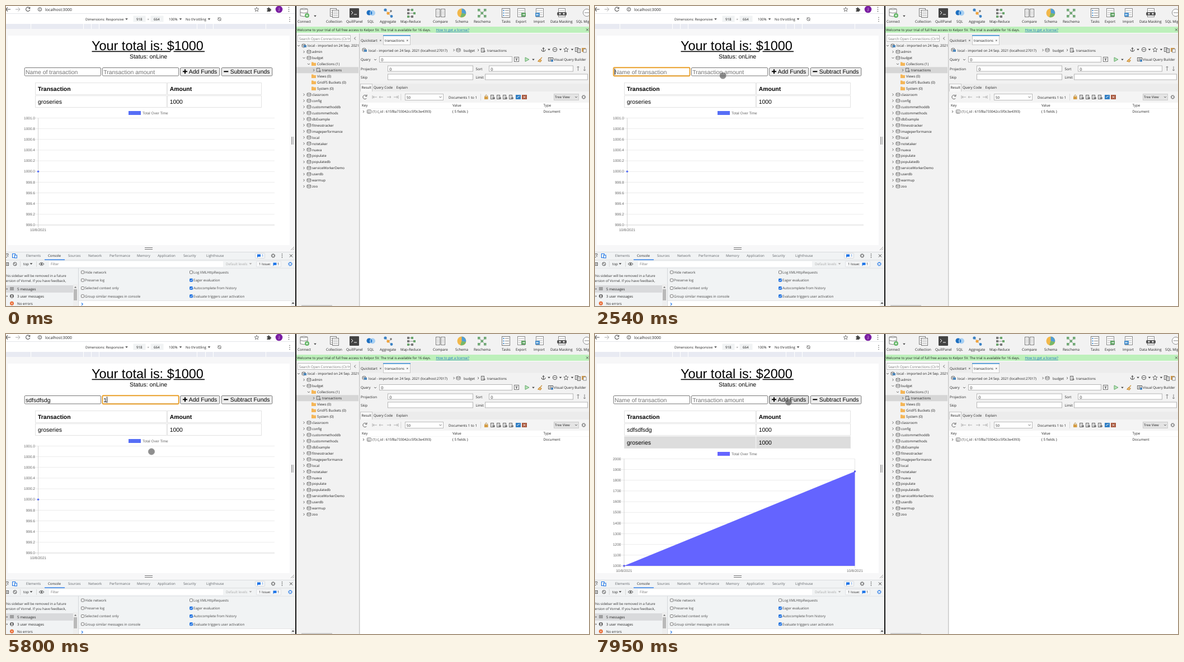
Recreate the animation shown at these times as an HTML page. Size 1042x537 px, loop 8000 ms.

```html
<!DOCTYPE html>
<html lang="en">
<head>
<meta charset="utf-8">
<title>Budget tracker</title>
<style>
  html, body { margin: 0; width: 100%; height: 100%; overflow: hidden; background: #fff; }
  svg { display: block; width: 100vw; height: 100vh; text-rendering: geometricPrecision; }
  text { font-family: "Open Sans", sans-serif; white-space: pre; }
  .page { font-family: "Liberation Sans", Arial, sans-serif; }
</style>
</head>
<body>
<svg id="stage" viewBox="0 0 1042 537"></svg>
<script>
const rect = (x, y, w, h, fill, stroke = 'none', rx = 0) =>
  `<rect x="${x}" y="${y}" width="${w}" height="${h}" fill="${fill}" stroke="${stroke}" rx="${rx}"/>`;
const text = (x, y, s, size = 6.2, fill = '#222', attrs = '') =>
  `<text x="${x}" y="${y}" font-size="${size}" fill="${fill}" ${attrs}>${s}</text>`;
const path = (d, stroke = '#555', width = 0.9, fill = 'none') =>
  `<path d="${d}" stroke="${stroke}" stroke-width="${width}" fill="${fill}"/>`;
const dot = (x, y, r, fill, stroke = 'none') =>
  `<circle cx="${x}" cy="${y}" r="${r}" fill="${fill}" stroke="${stroke}"/>`;
const group = (id, body, attrs = '') => `<g id="${id}" ${attrs}>${body}</g>`;
const paged = (x, y, s, size = 10.45, fill = '#000', attrs = '') =>
  text(x, y, s, size, fill, 'class="page" ' + attrs);
const down = (x, y, c = '#444') => path(`M${x - 2.3} ${y - 1.2}h4.6l-2.3 2.8z`, 'none', 0, c);
const chevron = (x, y, open) =>
  path(open ? `M${x - 2} ${y - 1}l2 2l2-2` : `M${x - 1} ${y - 2}l2 2l-2 2`, '#555', 0.9);
const range = n => [...Array(n).keys()];

// Address bar and device toolbar
function browserBar() {
  let s = rect(0, 0, 517, 32, '#fff') + rect(0, 13, 517, 0.7, '#dadce0');
  s += path('M8 6H0M3 2.5L-.5 6L3 9.5', '#555', 1.1);
  s += path('M17 6h8M21.5 2.5L25 6L21.5 9.5', '#aaa', 1);
  s += path('M42 3.5a3.6 3.6 0 1 0 .7 3M42.7 2v2.5h-2.7', '#555', 1.1);
  s += dot(60.5, 6, 3.2, 'none', '#555') + rect(60, 5.4, 1, 2.4, '#555') + rect(60, 3.9, 1, 0.9, '#555');
  s += text(70, 8.5, 'localhost:3000', 7.1);
  s += path('M448 2.3l1.1 2.5l2.7.3l-2 1.8l.6 2.7l-2.4-1.4l-2.4 1.4l.6-2.7l-2-1.8l2.7-.3z', '#555', 0.8);
  s += path('M466.5 4h2v-1.5h2V4h2v2h1.5v2h-1.5v2h-6V8h1V6h-1z', 'none', 0, '#444');
  s += dot(488, 6, 6.3, '#7b1fa2') + text(488, 8.4, 'J', 6.5, '#fff', 'text-anchor="middle"');
  s += [2.5, 6, 9.5].map(y => dot(505.5, y, 0.8, '#444')).join('');
  s += text(142, 26, 'Dimensions: Responsive', 6.05) + down(215.5, 23.5);
  s += rect(227.5, 17.5, 22, 11, '#f1f3f4') + rect(258.5, 17.5, 23, 11, '#f1f3f4');
  s += text(233, 26, '918') + text(252.5, 26, '×', 6.2, '#777') + text(264, 26, '664');
  s += text(291, 26, '100%') + down(312, 23.5) + text(321, 26, 'No throttling') + down(363, 23.5);
  s += dot(381.5, 23.5, 2.8, 'none', '#666') + path('M378.5 20.5l6 6', '#666', 0.8);
  s += [20.5, 24, 27.5].map(y => dot(507, y, 0.7, '#444')).join('');
  s += rect(0, 32, 517, 9, '#e8eaf2');
  s += [44, 138, 152, 166, 341, 356, 370, 464].map(x => rect(x, 32, 1, 9, '#fff')).join('');
  s += rect(0, 41, 517, 399, '#f7f7f8') + rect(3, 53, 504, 375, '#fff');
  s += rect(510, 234, 1, 14, '#888') + rect(512.5, 234, 1, 14, '#888');
  s += rect(248, 432, 14, 1, '#777') + rect(248, 435, 14, 1, '#777');
  return s + path('M509 437l6-6M512 437l3-3', '#888', 0.8);
}

const gear = (x, y, c) => dot(x, y, 2.4, 'none', c) +
  `<circle cx="${x}" cy="${y}" r="3.4" fill="none" stroke="${c}" stroke-dasharray="1.33"/>`;

function checkbox(x, y, label, on) {
  return rect(x + 0.5, y - 2.5, 5, 5, on ? '#1a6fe0' : '#fff', on ? '#1a6fe0' : '#777', 0.8) +
    (on ? path(`M${x + 1.3} ${y}l1.3 1.4l2.4-2.8`, '#fff', 1) : '') + text(x + 7, y + 2.4, label, 6.15, '#444');
}

function devtools() {
  let s = rect(0, 440, 517, 97, '#f1f3f4') + rect(0, 440, 517, 0.7, '#cfd1d5');
  s += rect(0, 454.5, 517, 0.7, '#cfd1d5') + rect(0, 468.8, 517, 0.7, '#dadce0');
  s += path('M0 443.5h4v3M0 449.5h2M1 445l3 4', '#555') + rect(11.5, 443.5, 5, 7, 'none', '#1a73e8') + rect(15.5, 446, 4, 5, '#f1f3f4', '#1a73e8');
  const tabs = [[36, 'Elements'], [75, 'Console'], [111, 'Sources'], [147, 'Network'], [185, 'Performance'],
    [234, 'Memory'], [271, 'Application'], [317, 'Security'], [358, 'Lighthouse']];
  s += tabs.map(([x, name], i) => text(x, 449.2, name, 6.1, i === 1 ? '#222' : '#5f6368')).join('');
  s += rect(69, 453.5, 36, 1.3, '#1a73e8');
  s += rect(445.5, 442.5, 17, 9, '#f7f8f9', '#d5d8dc', 1) + path('M449 444.5h6v4.3h-4.3l-1.7 1.7z', 'none', 0, '#1a73e8') + text(457, 449.3, '1', 6.1, '#1a73e8');
  s += gear(477.5, 447, '#555') + [444, 447, 450].map(y => dot(493.5, y, 0.8, '#444')).join('');
  s += path('M507 444.5l5 5m0-5l-5 5', '#444', 1);
  s += rect(-1.5, 459.5, 6, 5, 'none', '#555') + path('M1 460.5l2 1.5l-2 1.5z', 'none', 0, '#444');
  s += dot(16, 461.8, 3, 'none', '#555') + path('M14 459.8l4 4', '#555');
  s += rect(25, 457, 0.7, 10, '#ccc') + text(31, 464, 'top') + down(45, 461.5) + rect(54, 457, 0.7, 10, '#ccc');
  s += path('M59 461.8q4.5-5 9 0q-4.5 5-9 0z', '#444') + dot(63.5, 461.8, 1.4, '#444');
  s += rect(77, 457, 311, 10, '#fff') + text(80, 464.2, 'Filter', 6.2, '#777');
  s += text(393, 464.2, 'Default levels', 6.15, '#aaa') + down(437, 461.5, '#aaa');
  s += rect(447.5, 457, 44, 10, '#f7f8f9', '#e0e2e5', 1) + text(452, 464.2, '1 Issue:', 6.1) + path('M477.5 459.5h6v4.3h-4.3l-1.7 1.7z', 'none', 0, '#1a73e8') + text(485, 464.2, '1');
  s += gear(508, 461.8, '#1a73e8');
  s += text(-3.2, 485.2, 'This sidebar will be removed in a future', 6.05, '#333');
  s += text(-3.2, 494, 'version of Vornel. If you have feedback,', 6.05, '#333');
  s += rect(0, 500, 120, 13, '#d9dadc');
  s += path('M1 505l2 1.5l-2 1.5z', 'none', 0, '#555') + path('M7 504h7M7 506h7M7 508h7', '#555', 0.9) + text(20, 508.7, '5 messages');
  s += path('M1 518l2 1.5l-2 1.5z', 'none', 0, '#555') + dot(10.5, 519.3, 3.4, '#555') + dot(10.5, 518.2, 1.2, '#fff') + rect(8.7, 520, 3.6, 1.4, '#fff', 'none', 0.7) + text(20, 521.7, '3 user messages');
  s += dot(10.5, 532.3, 3.5, '#e8672e') + path('M9 530.8l3 3m0-3l-3 3', '#fff', 0.8) + text(20, 534.7, 'No errors');
  s += rect(120, 498, 8, 39, '#eee') + rect(121, 507, 6, 20, '#b9b9b9') + path('M122 504.5l2-2.5l2 2.5z', 'none', 0, '#666') + rect(129, 469, 0.8, 68, '#cfd1d5');
  s += ['Hide network', 'Preserve log', 'Selected context only', 'Group similar messages in console']
    .map((name, i) => checkbox(134, 476.5 + i * 14.25, name, false)).join('');
  s += ['Log XMLHttpRequests', 'Eager evaluation', 'Autocomplete from history', 'Evaluate triggers user activation']
    .map((name, i) => checkbox(328, 476.5 + i * 14.25, name, i > 0)).join('');
  s += rect(130, 527.5, 379, 10, '#fff') + rect(130, 527, 387, 0.7, '#ddd') + path('M135 531.5l2.2 2.2l-2.2 2.2', '#1a73e8', 1.1);
  return s + path('M510.5 533l2.5-3l2.5 3z', 'none', 0, '#555');
}

// Database client
const cylinder = (x, y, w = 7, h = 7, c = '#666') =>
  path(`M${x} ${y + 1.4}v${h - 2.8}q${w / 2} 2.4 ${w} 0v${2.8 - h}q${-w / 2}-2.4 ${-w} 0q${w / 2} 2.4 ${w} 0M${x} ${y + h / 2}q${w / 2} 2.4 ${w} 0`, c, 0.8, '#fafafa');
const folder = (x, y) => path(`M${x} ${y}h3l1 1.2h4v5.3h-8z`, 'none', 0, '#f5b657');
const sheet = (x, y, w = 6, h = 7, c = '#666') => rect(x, y, w, h, '#fff', c) +
  path(range(3).map(i => `M${x + 1.5} ${y + h * (i + 1) / 4}h${w - 3}`).join(''), c, 0.7);

function toolIcons() {
  let s = cylinder(526, 4, 13, 15) + dot(538, 17, 4, '#62b565') + path('M536 17h4M538 15v4', '#fff', 1) + down(552.5, 18);
  s += sheet(579.5, 4.5, 11, 14, '#777') + sheet(583.5, 7.5, 11, 13, '#777');
  s += rect(614, 4, 17, 17, '#444', 'none', 1) + path('M617 9l3 3l-3 3M622 15h5', '#fff', 1);
  s += dot(649, 12, 4.5, '#1e6fc0') + dot(655, 12.5, 5, '#a9d0f2') + path('M653 9a5 5 0 0 1 0 7a5 5 0 0 1 0-7', 'none', 0, '#2a7fd0');
  s += path('M678 7l5 6l6 6M683 13l6-3', '#999') + dot(678, 7, 2.6, '#3b82c4') + dot(683, 13, 2.6, '#f0a23b') + dot(689, 18.5, 2.4, '#3b82c4') + dot(688, 9, 1.8, '#777');
  s += [[717, 5], [724, 5], [717, 11], [717, 17], [724, 17], [728, 11]].map(([x, y], i) => rect(x, y, 4, 4, i % 2 ? '#6aa56c' : '#777')).join('') + path('M721 13h7M721 7h3M721 19h3', '#888');
  s += sheet(768.5, 5.5, 7, 14, '#777') + sheet(777.5, 5.5, 7, 14, '#777');
  s += dot(814.5, 12.5, 8, '#f2b84b') + path('M814.5 12.5V4.5a8 8 0 0 1 7.5 10z', 'none', 0, '#4f9fd8') + path('M814.5 12.5l7.5 2a8 8 0 0 1-10 5.5z', 'none', 0, '#75b86b');
  s += path('M845 7l12 12M857 7l-12 12', '#888') + [[843, 5], [854, 5], [843, 16], [854, 16], [848.5, 10.5]].map(([x, y]) => rect(x, y, 4.5, 4.5, '#72a977')).join('');
  s += rect(886.5, 4.5, 14, 16, '#fff', '#777') + path('M892 8h7M892 12.5h7M892 17h7', '#777') + [7, 11.5, 16].map(y => rect(888.5, y, 2, 2, '#3b82c4')).join('');
  s += sheet(914.5, 4.5, 13, 15, '#888') + rect(921, 12, 8, 7, '#64a568') + path('M923 15.5h4m-1.5-1.5l1.5 1.5l-1.5 1.5', '#fff');
  s += sheet(947.5, 4.5, 13, 15, '#888') + rect(946, 12, 8, 7, '#4f94cf') + path('M952 15.5h-4m1.5-1.5l-1.5 1.5l1.5 1.5', '#fff');
  s += sheet(987.5, 4.5, 12, 15, '#888') + rect(985, 11, 17, 6, '#555', 'none', 2) + dot(990, 14, 1.4, '#fff') + dot(997, 14, 1.4, '#fff');
  s += dot(1038, 12, 6.5, '#fff', '#888') + path('M1034 12h8', '#777');
  const labels = [[521, 'Connect'], [572, 'Collection'], [608, 'QuillPanel'], [646, 'SQL'], [668, 'Aggregate'],
    [705, 'Map-Reduce'], [763, 'Compare'], [803, 'Schema'], [836, 'Reschema'], [886, 'Tasks'], [911, 'Export'],
    [943, 'Import'], [973, 'Data Masking'], [1019, 'SQL Migration']];
  return s + labels.map(([x, name]) => text(x, 30, name, 6.25)).join('');
}

function tree() {
  let s = rect(519, 49, 113, 488, '#f2f2f2') + rect(521.5, 52.5, 94, 11, '#fff', '#bbb') + text(524, 60.5, 'Search Open Connections (Ctrl+', 6.2, '#777', 'clip-path="url(#searchClip)"');
  s += path('M625 55.5l-2.5 2.5l2.5 2.5', '#555') + rect(519, 109.3, 111, 11, '#d6d6d6');
  s += chevron(523, 71, true) + cylinder(529, 67.5, 6) + rect(532, 70, 5, 4, '#4d88bd') + text(539, 73.3, 'local - imported on 24 Sep. 2021', 6.15, '#222', 'clip-path="url(#treeClip)"');
  const nodes = ['admin', 'budget', 'Collections (1)', 'transactions', 'Views (0)', 'GridFS Buckets (0)', 'System (0)',
    'classroom', 'config', 'custommethoddb', 'custommethods', 'dbExample', 'fitnesstracker', 'imageperformance', 'local',
    'notetaker', 'nueva', 'populate', 'populatedb', 'serviceWorkerDemo', 'userdb', 'warmup', 'zoo'];
  nodes.forEach((name, i) => {
    const y = 82 + i * 10.95;
    if (i === 3) s += chevron(550, y, false) + sheet(555.5, y - 3.5, 5, 6) + dot(561, y + 2, 1.6, '#777') + text(565, y + 2.3, name, 6.15);
    else if (i > 1 && i < 7) s += (i === 2 ? chevron(541, y, true) : '') + folder(546, y - 3.3) + text(556, y + 2.3, name);
    else s += chevron(532.5, y, i === 1) + cylinder(538, y - 3.5) + text(547, y + 2.3, name, 6.15);
  });
  return s + rect(528, 535.5, 55, 1.5, '#c4c4c4') + rect(631, 49, 1.5, 488, '#c8c8c8');
}

const field = (x, y, w, value = '') => rect(x + 0.5, y + 0.5, w, 10, '#fff', '#b5b5b5') + text(x + 3, y + 8, value);

function queryPane() {
  let s = rect(633, 49, 409, 21, '#ececec') + rect(633, 69.5, 409, 468, '#f2f2f2');
  s += text(634, 64, 'Quickstart', 6.2) + text(667.5, 64, '×', 6.5) + rect(674.5, 52.5, 48, 17, '#fafafa', '#c8c8c8') + rect(674, 52, 49, 1.6, '#3b8fd1') + text(677, 64, 'transactions', 6.1) + text(715.5, 64, '×', 6.5);
  s += cylinder(637, 75, 6) + rect(640, 78, 5, 4, '#4d88bd') + text(648, 81.6, 'local - imported on 24 Sep. 2021 (localhost:27017)', 6.1) + chevron(800.5, 79, false) + cylinder(805, 75.5) + text(818, 81.6, 'budget', 6.1) + chevron(844, 79, false) + sheet(849.5, 75.5, 5) + dot(855, 81, 1.6, '#777') + text(860, 81.6, 'transactions', 6.1);
  s += path('M960.5 74v7M957 78q0 3.5 3.5 3.5q3.5 0 3.5-3.5M958.5 76h4', '#444', 1) + down(970.5, 78) + dot(981, 78, 3.7, 'none', '#555') + path('M978.5 78h5', '#555') + down(991, 78);
  s += path('M1001 74l1.2 2.8l3 .3l-2.3 2l.7 3l-2.6-1.6l-2.6 1.6l.7-3l-2.3-2l3-.3z', '#444', 0.8) + down(1012, 78) + sheet(1017.5, 74.5, 5) + sheet(1021.5, 76.5, 5) + rect(1029, 75, 7, 7, '#d09a4c') + rect(1032, 77, 5, 6, '#fff', '#888');
  s += text(634, 97.9, 'Query') + chevron(660, 96, true) + field(667, 90, 237, '{}') + rect(908.5, 91.5, 8, 8, '#fff', '#777') + path('M910 94h5M912.5 94v3.5l1.5-1.5M912.5 97.5l-1.5-1.5', '#555');
  s += path('M928 92l7 3.7l-7 3.7z', '#4a9d52', 0.8, '#b9e0b9') + down(942.5, 96) + path('M951 99l3-3.5l3 2l-2 2.5zM955 95l3-3', '#c88b35', 1.2, '#f2c77b');
  s += sheet(969.5, 92.5, 8, 6) + dot(976, 98, 2, '#3b82c4') + text(979, 98, 'Visual Query Builder', 6.1);
  s += text(634, 114.7, 'Projection') + field(682, 106.5, 152, '{}') + text(839.5, 114.7, 'Sort') + field(863, 106.5, 150, '{}') + path('M1022.5 116v-8m-2 2l2-2l2 2M1034 108v8m-2-2l2 2l2-2', '#777');
  s += text(634, 129.7, 'Skip') + field(682, 121.5, 152) + text(839.5, 129.7, 'Limit') + field(856, 121.5, 183);
  s += rect(633, 139, 409, 14, '#ececec') + rect(633.5, 139.5, 21, 14, '#f8f8f8', '#c8c8c8') + text(635.5, 148.3, 'Result', 6.1) + text(657, 148.3, 'Query Code', 6.2) + text(697.5, 148.3, 'Explain', 6.1);
  s += rect(633, 153, 409, 20, '#f4f4f4') + rect(633, 173, 409, 364, '#fff');
  s += path('M644.5 161a3.6 3.6 0 1 0 0 4M645 158.5v3h-3', '#555') + path('M655 160v6m8-3h-7m2-2l-2 2l2 2M667 163h7m-5-2l-2 2l2 2M681 163h7m-2-2l2 2l-2 2M693 163h7m-2-2l2 2l-2 2M701 160v6', '#aaa') + rect(705.5, 157, 0.7, 12, '#ccc');
  s += rect(713.5, 157.5, 68, 11, '#fff', '#bbb') + text(716, 165.5, '50') + chevron(776.5, 163, true) + text(791, 165.5, 'Documents 1 to 1', 6.2) + rect(848, 157, 0.7, 12, '#ccc');
  s += rect(855, 162, 6.5, 5, '#d49c43') + path('M856.5 162v-1.5q1.8-3 3.5 0v1.5', '#a87725');
  s += [866.5, 877.5, 888.5, 899.5].map(x => sheet(x, 159.5, 5) + dot(x + 5.5, 165, 2, '#777')).join('');
  s += rect(911, 159, 9, 8, '#317fc4') + path('M913 164l5-3', '#fff') + rect(922, 159, 9, 8, '#a8593f') + path('M924.5 161l4 4m0-4l-4 4', '#fff');
  s += rect(979.5, 157.5, 44, 11, '#e4e4e4', '#ccc') + text(981, 165.3, 'Tree View', 6) + chevron(1019, 163, true) + gear(1032.5, 163, '#666');
  s += text(636, 180.3, 'Key') + text(798, 180.3, 'Value') + text(960.5, 180.3, 'Type') + rect(633, 183.5, 409, 0.6, '#eee');
  s += chevron(639, 189, false) + rect(645.5, 186, 7, 6, '#fff', '#777', 1) + text(646.7, 190.8, '{}', 5) + text(655, 191.3, '(1) {_id : 615f8a733042cc5f0c3e4393}', 6.1) + text(797.5, 191.3, '{ 5 fields }') + text(960.5, 191.3, 'Document', 6.2);
  return s;
}

function client() {
  return rect(517, 0, 2, 537, '#111') + rect(519, 0, 523, 37, '#f2f2f2') + toolIcons() +
    rect(519, 37, 523, 11, '#bdf0bb') + text(520, 45, 'Welcome to your trial of full free access to Kelpor 5V. The trial is available for 16 days.', 6.05) +
    text(768.5, 45, 'How to get a license?', 6.1, '#1268c4', 'text-decoration="underline"') + path('M1037 40.5l4 4m0-4l-4 4', '#444', 0.9) +
    tree() + queryPane();
}

// Budget page
const row = (y, name, amount, fill = '#fff', attrs = '') =>
  rect(52.5, y + 0.5, 234.5, 21, fill, '#e2e2e2') + rect(288.5, y + 0.5, 168, 21, fill, '#e2e2e2') +
  paged(57, y + 14.5, name, 10.45, '#000', attrs) + paged(292.7, y + 14.5, amount, 10.45, '#000', attrs);

function chart(top, axisX, right, color, label) {
  const grid = range(11).map(i => {
    const y = top + i * 19.15;
    return rect(axisX - 5, y - 0.4, right - axisX + 5, 0.8, i === 10 ? '#c8c8c8' : '#e7e7e7') +
      paged(axisX - 5.5, y + 2.2, label(i), 6.53, '#666', 'text-anchor="end"');
  }).join('');
  return grid + rect(axisX - 0.4, top, 0.8, 196, '#c8c8c8') + rect(219, top - 12.5, 22, 7, color) +
    paged(244, top - 6.7, 'Total Over Time', 6.53, '#666');
}
const date = (x, y) => paged(x, y, '10/8/2021', 6.53, '#666', 'text-anchor="middle"');

function page() {
  let s = paged(153, 78.8, '', 23.45, '#000', 'id="total"') + rect(153.5, 80.6, 140.5, 1.6, '#000') + rect(299.5, 80.6, 55.5, 1.6, '#000');
  s += paged(254.5, 94, 'Status: onLine', 10.5, '#000', 'text-anchor="middle"');
  s += [33, 172.2].map((x, i) => rect(x + 0.2, 110.5, 136.3, 14.5, '#fff', '#767676', 1.5) +
    `<rect id="ring${i}" x="${x + 0.2}" y="110.3" width="136.3" height="14.9" fill="none" stroke="#eaa02a" stroke-width="1.9" rx="1.5"/>` +
    paged(x + 2, 121.5, '', 10.45, '#000', `id="input${i}"`)).join('');
  s += '<rect id="add" x="311.7" y="110.5" width="70" height="14.5" rx="1.5"/>' + path('M316 117.3h8M320 113.3v8', '#000', 2) + paged(326.8, 121.4, 'Add Funds');
  s += rect(385.3, 110.5, 90.5, 14.5, '#efefef', '#767676', 1.5) + path('M389.3 117.3h8', '#000', 2) + paged(400.7, 121.4, 'Subtract Funds');
  s += row(137, 'Transaction', 'Amount', '#fff', 'font-weight="bold"');
  s += group('before', row(160, 'groseries', '1000') + chart(200.5, 57.5, 480, '#566ef6', i => (1001 - i / 5).toFixed(1)) +
    dot(57.5, 296.2, 1.8, '#566ef6') + date(57.5, 403));
  s += group('after', row(160, 'sdfsdfsdg', '1000') + row(183, 'groseries', '1000', '#ddd') +
    chart(223.5, 52, 464.5, '#6464ff', i => 2000 - i * 100) + rect(464.1, 223.5, 0.8, 196, '#e0e0e0') +
    '<path id="area" fill="#6464ff"/>' + dot(52, 415, 1.8, '#5858e8') + '<circle id="tip" cx="464.5" r="1.8" fill="#5858e8"/>' + date(52, 426) + date(464.5, 426));
  return s + '<rect id="caret" width=".9" height="11" y="112.2"/>';
}

const stage = document.getElementById('stage');
stage.innerHTML = `<clipPath id="treeClip"><rect x="519" y="60" width="111" height="20"/></clipPath>
  <clipPath id="searchClip"><rect x="522" y="52" width="93" height="12"/></clipPath>` +
  browserBar() + page() + devtools() + client() +
  group('pointer', '<circle id="glow" r="8" fill="#f3e500" fill-opacity=".8"/><circle r="5.7" fill="#555" fill-opacity=".66" stroke="#999" stroke-opacity=".6"/>');

const el = id => document.getElementById(id);
const show = (id, on) => el(id).setAttribute('visibility', on ? 'visible' : 'hidden');

const LOOP = 8000, STEP = 90.5, SUBMIT = 7580;
const focusTimes = [1430, 4780];
const hints = ['Name of transaction', 'Transaction amount'];
const typed = [
  { value: 'sdfsdfsdg', times: [3340, 3515, 3690, 3960, 4055, 4145, 4240, 4330, 4420] },
  { value: '1000', times: [5690, 5960, 6230, 6585] }
];
const clicks = [[1430, 1620], [4690, 4790], [7390, SUBMIT]];
const trail = [[350, 737, 423], [600, 420, 280], [850, 52, 85], [1090, 94, 119], [1610, 94, 119], [1720, 300, 14],
  [1840, 521, 140], [1960, 400, 274], [2090, 200, 183], [2300, 190, 150], [2720, 263, 102], [2860, 255, 108],
  [3170, 140, 244], [3340, 131, 246], [4240, 131, 246], [4710, 208, 118], [5100, 208, 119], [5540, 260, 205],
  [5800, 260, 211], [6430, 280, 262], [6690, 280, 262], [6775, 306, 240], [7100, 335, 150], [7400, 345, 119],
  [7590, 345, 121], [7950, 346, 122], [8000, 346, 122]];

function pointerAt(t) {
  const i = Math.max(1, trail.findIndex(p => p[0] >= t));
  const [t0, x0, y0] = trail[i - 1], [t1, x1, y1] = trail[i];
  const k = (t - t0) / (t1 - t0);
  return [x0 + (x1 - x0) * k, y0 + (y1 - y0) * k];
}

function draw(time) {
  // The picture advances about eleven times a second.
  const t = 350 + STEP * Math.floor((time % LOOP - 335) / STEP);
  const done = t >= SUBMIT;
  const focus = done ? -1 : focusTimes.filter(f => t >= f).length - 1;
  el('total').textContent = 'Your total is: $' + (done ? 2000 : 1000);

  typed.forEach(({ value, times }, i) => {
    const count = done ? 0 : times.filter(k => t >= k).length;
    const input = el('input' + i);
    input.textContent = count ? value.slice(0, count) : hints[i];
    input.setAttribute('fill', count ? '#000' : '#757575');
    show('ring' + i, focus === i);
    if (focus === i) {
      const x = +input.getAttribute('x') + (count ? input.getComputedTextLength() : 0);
      el('caret').setAttribute('x', x);
      const since = t - (count ? times[count - 1] : focusTimes[i]);
      show('caret', since % 1060 < 530);
    }
  });
  if (focus < 0) show('caret', false);

  show('before', !done);
  show('after', done);
  const ease = 1 - (1 - Math.min(1, Math.max(0, (t - 7522) / 1037))) ** 4;
  const y = 415 - 191.5 * ease;
  el('area').setAttribute('d', `M52 415L464.5 ${y}V415z`);
  el('tip').setAttribute('cy', y);

  const visible = t >= 350;
  const [px, py] = pointerAt(Math.max(350, t));
  const hover = visible && px > 311 && px < 382 && py > 110 && py < 125;
  el('add').setAttribute('fill', hover ? '#e2e2e2' : '#efefef');
  el('add').setAttribute('stroke', hover ? '#4a4a4a' : '#767676');
  el('pointer').setAttribute('transform', `translate(${px} ${py})`);
  show('pointer', visible);
  show('glow', visible && clicks.some(([a, b]) => t >= a && t < b));
}

function tick() {
  draw(performance.now());
  requestAnimationFrame(tick);
}
tick();
</script>
</body>
</html>
```
